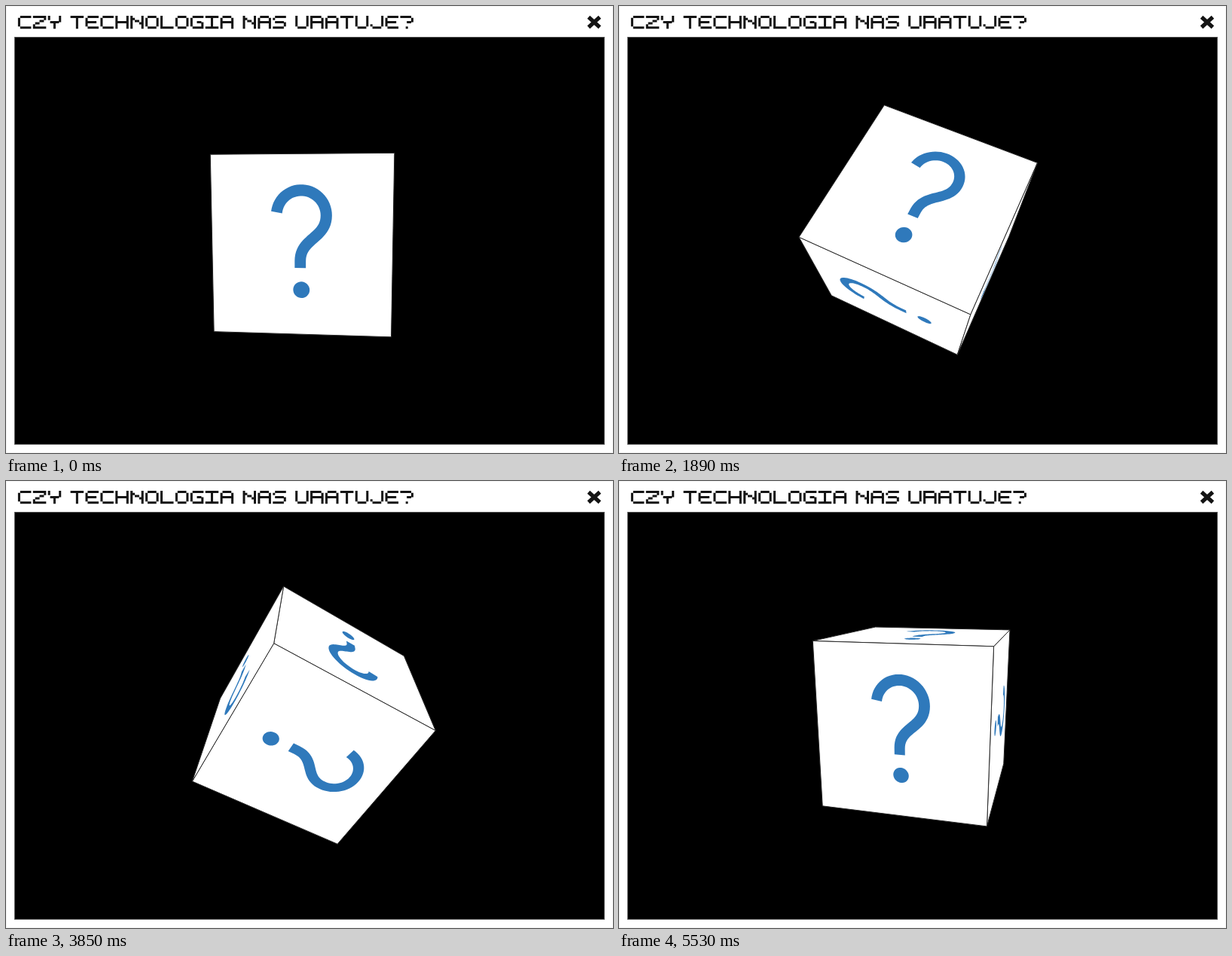
Write an HTML page that moves like this. It is 806 px wide and 594 px high and loops after 5.6 s.

```html
<!DOCTYPE html>
<html lang="pl">
<head>
<meta charset="utf-8">
<title>Czy technologia nas uratuje?</title>
<style>
html, body { margin: 0; width: 100%; height: 100%; overflow: hidden; background: #fff; }
svg { display: block; width: 806px; height: 594px; }
.pixel { fill: none; stroke: #141414; stroke-width: 1.04; stroke-linecap: square; }
.close { stroke: #141414; stroke-width: 5.2; stroke-linecap: square; }
.side { fill: #fff; stroke: #2a2a2a; stroke-width: 1; stroke-linejoin: round; }
.mark { fill: #2f79bb; }
</style>
</head>
<body>
<svg viewBox="0 0 806 594">
  <rect width="806" height="594" fill="#fff"/>
  <rect x=".5" y=".5" width="805" height="593" fill="none" stroke="#f4f4f4"/>
  <rect x="11.5" y="41.5" width="783" height="541" fill="#000" stroke="#555"/>
  <g id="title" class="pixel" role="img"></g>
  <path class="close" d="M775.5 16.5L786.5 26.5M786.5 16.5L775.5 26.5"/>
  <g id="cube"></g>
</svg>
<script>
const NS = 'http://www.w3.org/2000/svg';
const add = (parent, cls) => {
  const p = document.createElementNS(NS, 'path');
  if (cls) p.setAttribute('class', cls);
  return parent.appendChild(p);
};

// Title lettering: each letter is built from shared strokes on a 6 x 6 grid
const TITLE = 'CZY TECHNOLOGIA NAS URATUJE?';
const STROKES = {
  t: 'M1 0H4', m: 'M1 2.5H4', b: 'M1 5H4',
  l: 'M0 1V4', r: 'M5 1V4', c: 'M2.5 0V5',
  1: 'M0 0h0', 2: 'M5 0h0', 3: 'M0 5h0', 4: 'M5 5h0',
  k: 'M0 1h0', p: 'M5 1V2', j: 'M5 3V4', i: 'M0 4h0',
  g: 'M3 2.5H4', q: 'M2.5 3V5', d: 'M2.5 5h0',
  z: 'M5 1h0M3 2H4M1 3H2M0 4h0', n: 'M1 1h0M2 2H3M4 3h0'
};
const LETTERS = {
  A: 'tlrm34', C: 'tlb24', E: 'tlbm24', G: 'tlb24gj', H: 'lrm1234', I: 't12cb34',
  J: 'rb2i', L: 'lb134', N: 'lrn1234', O: 'tlbr', R: 't1lpmj34', S: 't2kmjb3',
  T: 't12c', U: 'lrb12', Y: '12kpmq', Z: 't12zb34', '?': 't1pgd'
};
const title = document.getElementById('title');
title.setAttribute('aria-label', TITLE);
let pen = 17.4;
for (const ch of TITLE) {
  if (ch === ' ') { pen += 10; continue; }
  const p = add(title);
  p.setAttribute('d', [...LETTERS[ch]].map(k => STROKES[k]).join(''));
  p.setAttribute('transform', `translate(${pen} 14.4) scale(2.9 2.85)`);
  pen += 19.9;
}

// Question mark in face units (0..1): an arc, an S-bend and a short stem
const BOWL = { x: .503, y: .333, r: .137 };
const STEM = { x: .497, y: .585, end: .624 };
const HALF = .031;

const range = (n, f) => Array.from({ length: n + 1 }, (_, i) => f(i / n));
const circle = (x, y, r, from, to, n) => range(n, t => {
  const a = from + (to - from) * t;
  return [x + r * Math.cos(a), y + r * Math.sin(a)];
});

function centreLine() {
  const right = BOWL.x + BOWL.r, mid = (BOWL.y + STEM.y) / 2;
  const arc = circle(BOWL.x, BOWL.y, BOWL.r, -Math.PI + .12, 0, 30);
  const bend = range(24, t => {
    const m = 1 - t, near = m * m * (1 + 2 * t), pull = 3 * m * t;
    return [
      right * near + STEM.x * (1 - near),
      BOWL.y * m ** 3 + mid * pull + STEM.y * t ** 3
    ];
  });
  return [...arc, ...bend.slice(1), [STEM.x, STEM.end]];
}

function thicken(line, half) {
  const offset = side => line.map(([x, y], i) => {
    const [x0, y0] = line[Math.max(0, i - 1)];
    const [x1, y1] = line[Math.min(line.length - 1, i + 1)];
    const k = side * half / Math.hypot(x1 - x0, y1 - y0);
    return [x + (y1 - y0) * k, y - (x1 - x0) * k];
  });
  return [...offset(1), ...offset(-1).reverse()];
}

const HOOK = thicken(centreLine(), HALF);
const DOT = circle(BOWL.x, .747, .046, 0, 2 * Math.PI, 36);
const SQUARE = [[0, 0], [1, 0], [1, 1], [0, 1]];

// Picture axes follow the normal in cyclic order, swapped on negative sides
const cube = document.getElementById('cube');
const unit = (i, sign = 1) => [0, 1, 2].map(k => k === i % 3 ? sign : 0);
const FACES = [0, 1, 2].flatMap(i => [1, -1].map(sign => {
  const plane = [unit(i + 1), unit(i + 2)];
  if (sign < 0) plane.reverse();
  return { axes: [unit(i, sign), ...plane], side: add(cube, 'side'), mark: add(cube, 'mark') };
}));

const CX = 403.4, CY = 306.6, FOCAL = 626.5, DIST = 3.09;

// The same angle turns the cube about y, then about x
function turn([x, y, z], s, c) {
  const depth = z * c - x * s;
  return [x * c + z * s, y * c - depth * s, y * s + depth * c];
}

function outline(points, n, r, d) {
  return 'M' + points.map(([u, v]) => {
    const [x, y, z] = [0, 1, 2].map(i => n[i] / 2 + r[i] * (u - .5) + d[i] * (v - .5));
    const k = FOCAL / (DIST - z);
    return (CX + x * k).toFixed(2) + ' ' + (CY + y * k).toFixed(2);
  }).join('L') + 'Z';
}

const STEP = 70, LOOP = 5600, LAST = LOOP / STEP - 1;

// Nearly even turning, in degrees, running slightly ahead mid-loop
function angleAt(step) {
  const p = step / LAST;
  return -5.7 + 351 * p + 1.7 * Math.sin(Math.PI * p) ** 4;
}

function draw(ms) {
  const angle = angleAt(Math.floor(ms % LOOP / STEP)) * Math.PI / 180;
  const s = Math.sin(angle), c = Math.cos(angle);
  for (const { axes, side, mark } of FACES) {
    const [n, r, d] = axes.map(v => turn(v, s, c));
    const seen = n[2] * DIST > .5;
    side.setAttribute('d', seen ? outline(SQUARE, n, r, d) : '');
    mark.setAttribute('d', seen ? outline(HOOK, n, r, d) + outline(DOT, n, r, d) : '');
  }
}

const start = performance.now();
function tick() {
  draw(performance.now() - start);
  requestAnimationFrame(tick);
}
tick();
</script>
</body>
</html>
```
